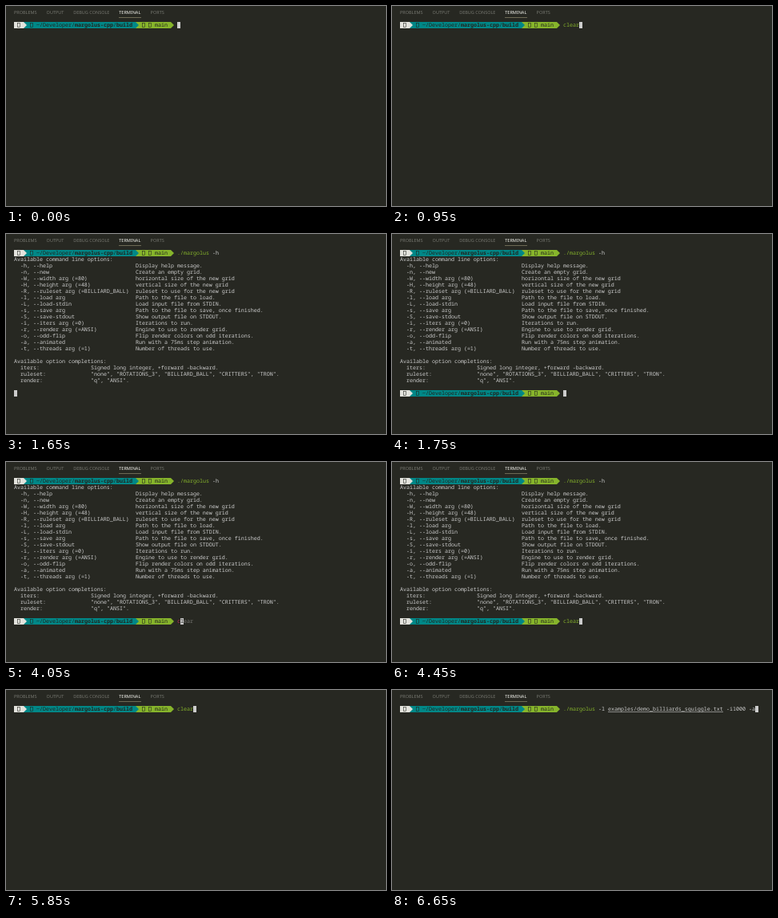
Recreate the animation shown at these times as an HTML page. Size 475 by 251 pixels, loop 8000 ms.

```html
<!DOCTYPE html>
<html lang="en">
<head>
<meta charset="utf-8">
<title>Terminal session</title>
<style>
  html, body { margin: 0; width: 100%; height: 100%; overflow: hidden; background: #272822; }
  svg { display: block; width: 475px; height: 251px; }
  text { text-rendering: geometricPrecision; white-space: pre; }
  .tab { font: 5.5px "Noto Sans", "Open Sans", sans-serif; fill: #777871; }
  .tab.on { fill: #f8f8f2; }
  .term { font: 6.667px "Noto Sans Mono", "DejaVu Sans Mono", monospace; }
  .bold { font-weight: 700; }
</style>
</head>
<body>
<svg id="stage" viewBox="0 0 475 251">
  <rect width="475" height="251" fill="#272822"/>
  <g id="tabs"></g>
  <g id="screen" class="term"></g>
</svg>
<script>
const LOOP = 8000, CELL = 4, LINE = 8, LEFT = 10, TOP = 20;
const FG = '#cccccc', DARK = '#22231e', GREEN = '#86b42b', TEAL = '#008787',
      WHITE = '#e3e3dd', RED = '#c4265e', DIM = '#777772';
const PROMPT_END = 51, LAST_ROW = 22;

const options = [
  ['-h, --help', 'Display help message.'],
  ['-n, --new', 'Create an empty grid.'],
  ['-W, --width arg (=80)', 'horizontal size of the new grid'],
  ['-H, --height arg (=48)', 'vertical size of the new grid'],
  ['-R, --ruleset arg (=BILLIARD_BALL)', 'ruleset to use for the new grid'],
  ['-l, --load arg', 'Path to the file to load.'],
  ['-L, --load-stdin', 'Load input file from STDIN.'],
  ['-s, --save arg', 'Path to the file to save, once finished.'],
  ['-S, --save-stdout', 'Show output file on STDOUT.'],
  ['-i, --iters arg (=0)', 'Iterations to run.'],
  ['-r, --render arg (=ANSI)', 'Engine to use to render grid.'],
  ['-o, --odd-flip', 'Flip render colors on odd iterations.'],
  ['-a, --animated', 'Run with a 75ms step animation.'],
  ['-t, --threads arg (=1)', 'Number of threads to use.']
];
const completions = [
  ['iters:', 'Signed long integer, +forward -backward.'],
  ['ruleset:', '"none", "ROTATIONS_3", "BILLIARD_BALL", "CRITTERS", "TRON".'],
  ['render:', '"q", "ANSI".']
];

const px = col => LEFT + col * CELL;
const py = row => TOP + row * LINE;
const rect = (x, y, w, h, fill) =>
  `<rect x="${x}" y="${y}" width="${w}" height="${h}" fill="${fill}"/>`;
const text = (col, row, s, fill = FG, cls = '') =>
  `<text x="${px(col)}" y="${py(row) + 6.35}" fill="${fill}" class="${cls}">${s}</text>`;
const block = (col, row, cols, fill) => rect(px(col), py(row), cols * CELL, LINE, fill);
const arrow = (col, row, fill) =>
  `<path d="M${px(col)} ${py(row)}l4 4l-4 4z" fill="${fill}"/>`;
const box = (col, row) =>
  `<rect x="${px(col) + 0.5}" y="${py(row) + 1.6}" width="3" height="5" fill="none" stroke="${DARK}" stroke-width=".55"/>`;
const cursor = (col, row) => block(col, row, 1, FG);

function prompt(row) {
  return block(0, row, 3, WHITE) + block(3, row, 35, TEAL) + arrow(3, row, WHITE) +
    block(38, row, 11, GREEN) + arrow(38, row, TEAL) + arrow(49, row, GREEN) +
    [1, 5, 40, 42].map(c => box(c, row)).join('') +
    text(7, row, '~/Developer/', DARK) +
    text(19, row, 'margolus-cpp', DARK, 'bold') +
    text(31, row, '/', DARK) +
    text(32, row, 'build', DARK, 'bold') +
    text(44, row, 'main', DARK);
}

// Each part of a command is [string, colour, underlined].
function command(row, parts) {
  let col = PROMPT_END, out = '';
  for (const [s, fill, line] of parts) {
    out += text(col, row, s, fill);
    if (line) out += rect(px(col), py(row) + 7, s.length * CELL, 0.6, fill);
    col += s.length + 1;
  }
  return { out, end: parts.length ? col - 1 : col };
}

function ready(row, parts = []) {
  const { out, end } = command(row, parts);
  return prompt(row) + out + cursor(end, row);
}

function typing(row, word, n) {
  const at = PROMPT_END + n;
  return prompt(row) + text(PROMPT_END, row, word.slice(0, n), RED) + cursor(at, row) +
    text(at, row, word[n], DARK) + text(at + 1, row, word.slice(n + 1), DIM);
}

const CLEAR = [['clear', GREEN]];
const HELP = [['./margolus', GREEN], ['-h', FG]];
const LOAD = [['./margolus', GREEN], ['-l', FG],
  ['examples/demo_billiards_squiggle.txt', FG, true], ['-i1000', FG], ['-a', FG]];

const help = prompt(0) + command(0, HELP).out +
  text(0, 1, 'Available command line options:') +
  options.map(([o, d], i) => text(2, i + 2, o) + text(38, i + 2, d)).join('') +
  text(0, 17, 'Available option completions:') +
  completions.map(([o, d], i) => text(2, i + 18, o) + text(24, i + 18, d)).join('');

const steps = [
  [0, ready(0)],
  [950, ready(0, CLEAR)],
  [1100, ready(0, LOAD)],
  [1200, ready(0, HELP)],
  [1650, help + cursor(0, LAST_ROW)],
  [1750, help + ready(LAST_ROW)],
  [4050, help + typing(LAST_ROW, 'clear', 1)],
  [4150, help + typing(LAST_ROW, 'clear', 2)],
  [4300, help + typing(LAST_ROW, 'clear', 3)],
  [4400, help + typing(LAST_ROW, 'clear', 4)],
  [4450, help + ready(LAST_ROW, CLEAR)],
  [5000, cursor(0, 0)],
  [5100, ready(0)],
  [5850, ready(0, CLEAR)],
  [6000, ready(0, HELP)],
  [6650, ready(0, LOAD)]
];

const tabs = [['PROBLEMS', 10], ['OUTPUT', 50.6], ['DEBUG CONSOLE', 84.2], ['TERMINAL', 141.3], ['PORTS', 180.6]];
document.getElementById('tabs').innerHTML = tabs.map(([s, x]) =>
  `<text x="${x}" y="10.4" class="tab${s === 'TERMINAL' ? ' on' : ''}">${s}</text>`).join('') +
  rect(141, 14.2, 28, 0.7, '#8a866c');

const screen = document.getElementById('screen');
let shown = -1;
function draw() {
  const t = performance.now() % LOOP;
  const i = steps.findLastIndex(([at]) => at <= t);
  if (i !== shown) screen.innerHTML = steps[shown = i][1];
  requestAnimationFrame(draw);
}
draw();
</script>
</body>
</html>
```
